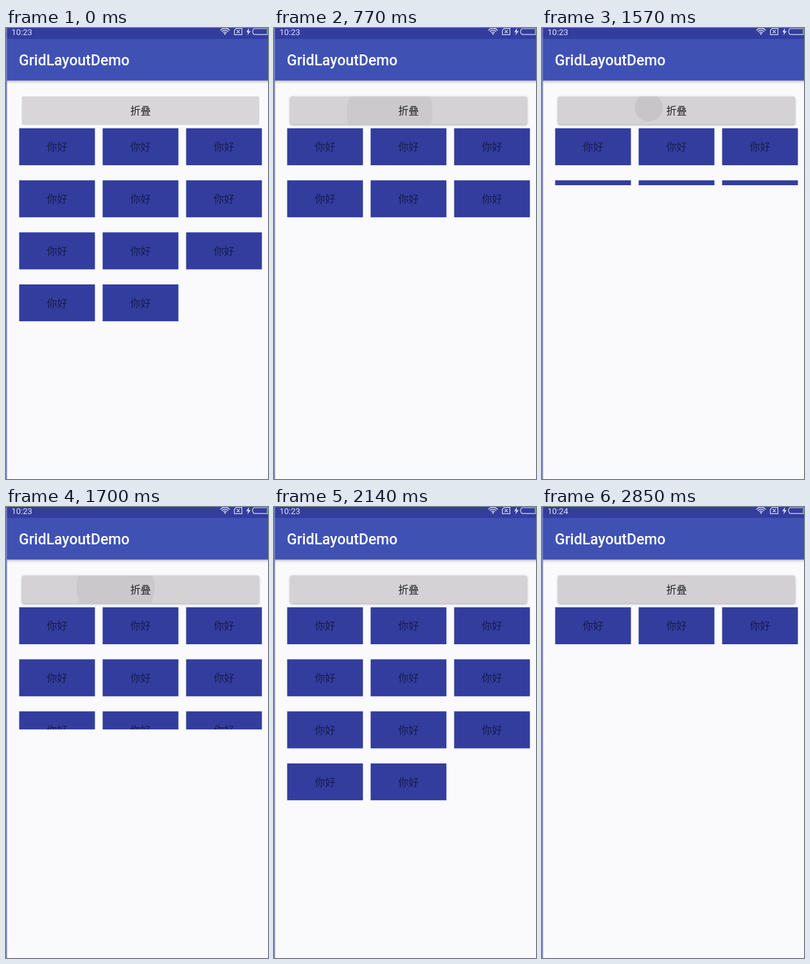
Animation of 408 by 700 pixels, one loop 3210 ms. Source, as an HTML page with a canvas:

```html
<!DOCTYPE html>
<html lang="zh">
<head>
<meta charset="utf-8">
<title>GridLayoutDemo</title>
<style>
html, body { margin: 0; width: 100%; height: 100%; overflow: hidden; background: #fafafc; }
canvas { display: block; }
</style>
</head>
<body>
<canvas id="stage" width="408" height="700"></canvas>
<script>
const ctx = document.getElementById('stage').getContext('2d');
const LOOP = 3210, DURATION = 500;
const OPEN = 455.5, FOLDED = 213;
const CJK = '16px "Noto Sans CJK SC", "Noto Sans CJK", sans-serif';

// The screen refreshes only at these moments.
const TICKS = [0, 620, 770, 890, 1040, 1570, 1700, 1840, 2000, 2140, 2420, 2570, 2720, 2850];

// Each tap toggles the grid; a long press starts with a full-width ripple.
const TAPS = [
  { at: 587, x: 179, y: 132.5, radius: 12 },
  { at: 1537, x: 165, y: 123, radius: 12 },
  { at: 2437, x: 174, y: 128, radius: 400 }
];

const clamp = v => Math.min(1, Math.max(0, v));
const mix = (a, b, f) => a + (b - a) * f;
const easeOut = u => 1 - (1 - u) ** 2;

function rect(x, y, w, h, color) {
  ctx.fillStyle = color;
  ctx.fillRect(x, y, w, h);
}

function text(s, x, y, font, color, align = 'left') {
  ctx.font = font;
  ctx.fillStyle = color;
  ctx.textAlign = align;
  ctx.fillText(s, x, y);
}

function shadow(blur, y) {
  ctx.shadowColor = 'rgba(0,0,0,.35)';
  ctx.shadowBlur = blur;
  ctx.shadowOffsetY = y;
}

function stroke(path) {
  ctx.lineWidth = 1.2;
  ctx.stroke(new Path2D(path));
}

function statusIcons() {
  ctx.strokeStyle = ctx.fillStyle = '#d5d9f0';
  for (const r of [3.6, 6.6, 9.6]) {
    ctx.beginPath();
    ctx.arc(341, 10, r, -Math.PI * .77, -Math.PI * .23);
    ctx.lineWidth = 1.5;
    ctx.stroke();
  }
  ctx.fill(new Path2D('M339.3 8.6L341 11L342.7 8.6Q341 7.4 339.3 8.6Z'));
  stroke('M358.5 .6H367.4V10.4H355.6V3.5ZM359.3 3.2L364 7.9M364 3.2L359.3 7.9');
  ctx.fill(new Path2D('M378.5 0L374 6.4H377L376 11.5L381 4.8H378Z'));
  stroke('M410 1H388Q384 1 384 5.5T388 10.2H410');
  rect(406, 1.6, 2, 8, '#55b948');
}

function bars(clock) {
  ctx.save();
  shadow(5, 1.5);
  rect(-10, 0, 428, 81.5, '#4051b4');
  ctx.restore();
  rect(0, 0, 408, 17, '#323d9e');
  text(clock, 8.5, 10.7, '13px Roboto, sans-serif', '#dfe2f3');
  text('GridLayoutDemo', 20, 58, '500 23px Roboto, sans-serif', '#fff');
  statusIcons();
}

function button(tap, u) {
  const box = new Path2D();
  if (tap) box.roundRect(25, 106.5, 369, 43, 2.5);
  else box.roundRect(24.5, 106, 370, 44.5, 3);
  ctx.save();
  if (tap) shadow(3.5, 1);
  ctx.fillStyle = tap ? '#d4d2d5' : '#d8d6d9';
  ctx.fill(box);
  ctx.restore();
  if (tap) {
    ctx.save();
    ctx.clip(box);
    ctx.fillStyle = `rgba(0,0,0,${.068 * (1 - u)})`;
    ctx.beginPath();
    ctx.arc(mix(tap.x, 182, u), mix(tap.y, 128, u), tap.radius + 150 * u, 0, 7);
    ctx.fill();
    ctx.restore();
  }
  text('折叠', 209.5, 134, CJK, '#202022', 'center');
}

function grid(bottom) {
  ctx.save();
  ctx.beginPath();
  ctx.rect(0, 155, 408, bottom - 155);
  ctx.clip();
  for (let i = 0; i < 11; i++) {
    const x = 20.5 + i % 3 * 130, y = 155.6 + Math.floor(i / 3) * 80.8;
    rect(x, y, 118, 57.4, '#323d9e');
    text('你好', x + 59, y + 34.6, CJK, 'rgba(0,0,0,.54)', 'center');
  }
  ctx.restore();
}

function draw(now) {
  const t = TICKS.findLast(tick => tick <= now % LOOP);
  const n = TAPS.findLastIndex(tap => tap.at - 20 <= t);
  const tap = TAPS[n];
  const u = tap ? clamp((t - tap.at) / DURATION) : 1;
  const [from, to] = n % 2 ? [FOLDED, OPEN] : [OPEN, FOLDED];
  rect(0, 0, 408, 700, '#fafafc');
  bars(t < 2570 ? '10:23' : '10:24');
  button(tap, u);
  grid(tap ? mix(from, to, easeOut(u)) : OPEN);
  rect(0, 0, 1.6, 700, '#7485c4');
}

let start;
function frame(now) {
  start ??= now;
  draw(Math.max(0, now - start));
  requestAnimationFrame(frame);
}
draw(0);
requestAnimationFrame(frame);
</script>
</body>
</html>
```
